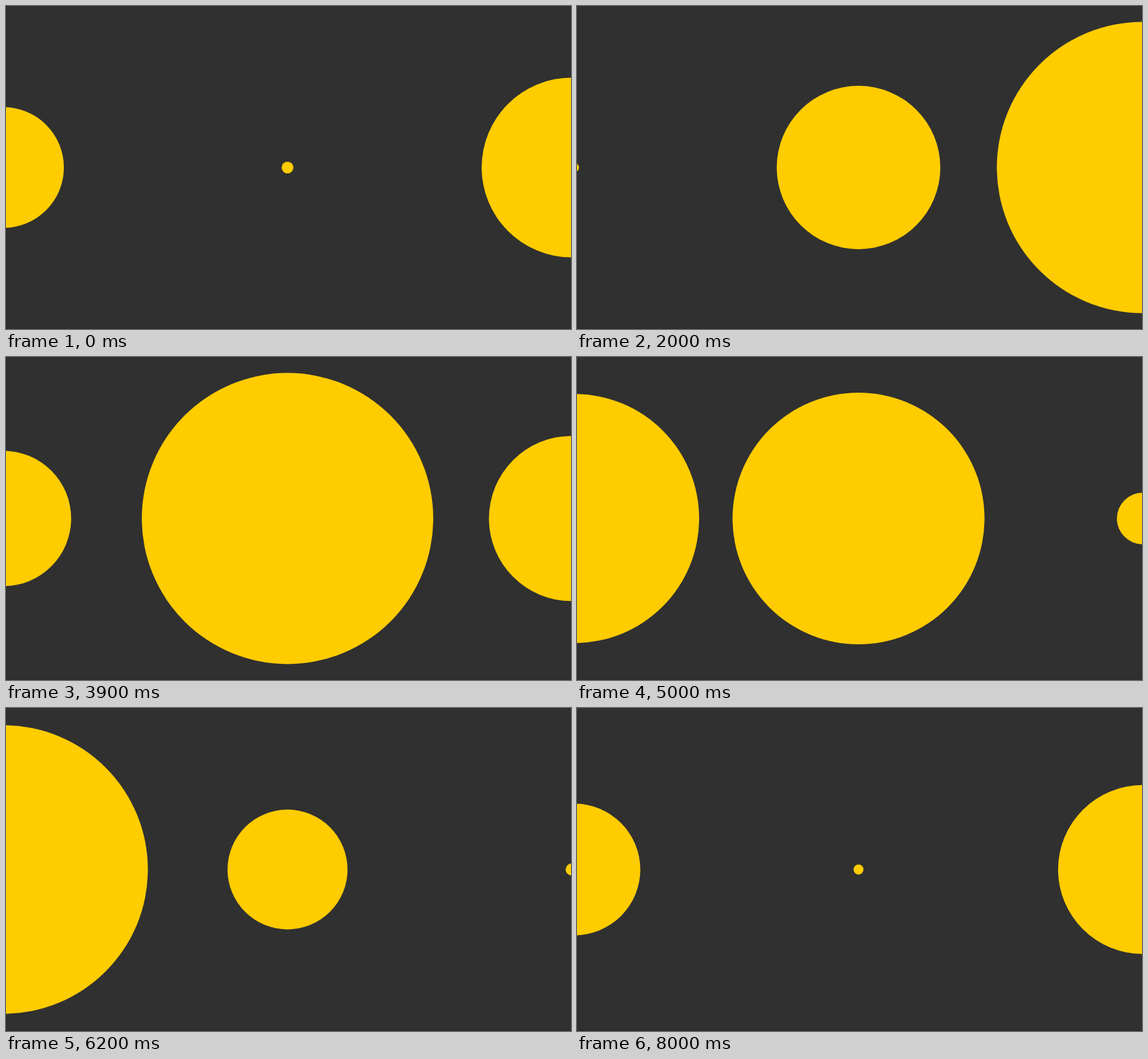
An HTML page that plays this animation: 870x498 px, repeating every 8.1 s.

```html
<!DOCTYPE html>
<html lang="en">
<head>
<meta charset="utf-8">
<title>Pulsing circles</title>
<style>
  html, body { margin: 0; height: 100%; overflow: hidden; background: #303030; }
  svg { display: block; }
</style>
</head>
<body>
<svg width="870" height="498" viewBox="0 0 870 498" fill="#fc0">
  <rect y="497" width="870" height="1" fill="#2a292a"/>
  <circle cx="-4" cy="249"/>
  <circle cx="433.5" cy="249"/>
  <circle cx="871" cy="249"/>
</svg>
<script>
const LOOP = 8100, STEP = 100;
const MIN_R = 6.7, MAX_R = 225;
const circles = document.querySelectorAll('circle');

// One turn per loop, running a little slower on the way up than down
function phaseAt(t) {
  const turn = 2 * Math.PI * t / LOOP;
  return turn + 0.11 + 0.1 * Math.cos(turn);
}

function radius(phase) {
  return MIN_R + (MAX_R - MIN_R) * (1 - Math.cos(phase)) / 2;
}

function draw(now) {
  const t = Math.floor(now % LOOP / STEP) * STEP;
  const phase = phaseAt(t);
  // Neighbours run a quarter turn apart
  circles.forEach((c, i) => c.setAttribute('r', radius(phase + (i - 1) * Math.PI / 2)));
}

let start;
function tick(now) {
  start ??= now;
  draw(now - start);
  requestAnimationFrame(tick);
}
draw(0);
requestAnimationFrame(tick);
</script>
</body>
</html>
```
